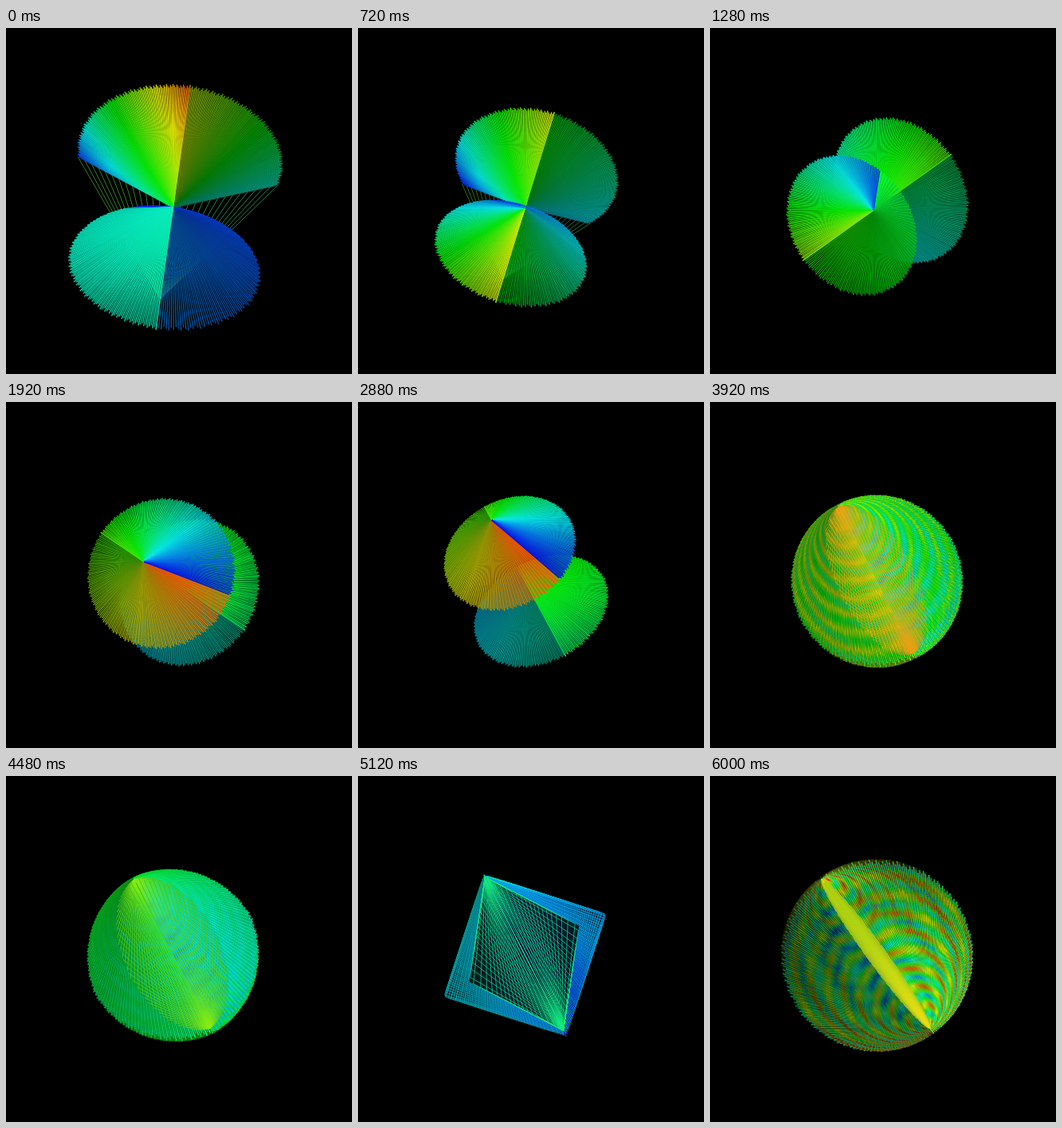
Animation, 434 px wide and 434 px high, one loop 6080 ms. Source, as an HTML page with a canvas:

```html
<!DOCTYPE html>
<html lang="en">
<head>
<meta charset="utf-8">
<title>Line sphere</title>
<style>
  html, body { margin: 0; width: 100%; height: 100%; overflow: hidden; background: #000; }
  canvas { display: block; }
</style>
</head>
<body>
<canvas id="stage" width="434" height="434"></canvas>
<script>
const SIZE = 434, LOOP = 6080, STEP = 80, LINES = 140;
const CENTRE = { x: 209.5, y: 225 };
const ctx = document.getElementById('stage').getContext('2d');

const lerp = (a, b, k) => a + (b - a) * k;
const clamp = x => Math.min(1, Math.max(0, x));
const smooth = x => { x = clamp(x); return x * x * (3 - 2 * x); };
const bell = (t, middle, width) => Math.exp(-(((t - middle) / width) ** 2));
const rad = deg => deg * Math.PI / 180;
const polar = (from, angle, r) => ({ x: from.x + r * Math.cos(rad(angle)), y: from.y + r * Math.sin(rad(angle)) });

// The key points on both sides of a time, and the eased weight between them.
function between(keys, t) {
  const i = Math.max(1, keys.findIndex(k => k[0] > t));
  const [a, b] = t >= keys.at(-1)[0] ? [keys.at(-1), keys.at(-1)] : [keys[i - 1], keys[i]];
  return [a[1], b[1], a === b ? 0 : smooth((t - a[0]) / (b[0] - a[0]))];
}
const track = (keys, t) => lerp(...between(keys, t));

const nearShift = [[0, 0.5], [720, 0.49], [1920, 0.16], [2880, 0.37], [3920, 0]];
const farShift = [[0, 0.42], [720, 0.4], [1920, 0.23], [2880, 0.4], [3920, 0]];
const lensWidth = [[3920, 0.45], [5120, 0.68], [6000, 0.1]];
const lensHue = [[3920, 38], [5120, 148], [6000, 56]];

// Hues at both ends of each half fan.
const cones = { nearLit: [105, 235], nearDark: [108, 20], farLit: [145, 112], farDark: [165, 205] };
const palettes = [
  [0, { nearLit: [165, 170], nearDark: [208, 230], farLit: [22, 225], farDark: [70, 170] }],
  [720, { nearLit: [68, 205], nearDark: [120, 226], farLit: [65, 235], farDark: [122, 185] }],
  [1920, cones],
  [2880, cones],
  [3920, { nearLit: [100, 150], nearDark: [95, 105], farLit: [100, 150], farDark: [80, 110] }],
  [5120, { nearLit: [160, 236], nearDark: [155, 212], farLit: [165, 236], farDark: [155, 210] }],
  [6000, { nearLit: [70, 110], nearDark: [70, 150], farLit: [85, 118], farDark: [60, 150] }]
];

function hues(t, name) {
  const [a, b, k] = between(palettes, t);
  return a[name].map((h, i) => lerp(h, b[name][i], k));
}

// An ellipse around a point on the axis; facet turns it into a diamond.
function rimPoint(rim, a) {
  const c = Math.cos(rad(a)), s = Math.sin(rad(a));
  const k = 1 / lerp(1, Math.abs(c) + Math.abs(s), rim.facet);
  return polar(polar(rim.centre, rim.axis, rim.deep * c * k), rim.axis + 90, rim.wide * s * k);
}

// A disc inside the sphere that touches it at the end of the axis.
function disc(axis, radius, shift, taper, facet) {
  return {
    axis, facet,
    centre: polar(CENTRE, axis, shift * radius),
    deep: (1 - shift) * radius,
    wide: (1 - taper * Math.sqrt(shift)) * radius
  };
}

function line(a, b, paint) {
  ctx.strokeStyle = paint;
  ctx.beginPath();
  ctx.moveTo(a.x, a.y);
  ctx.lineTo(b.x, b.y);
  ctx.stroke();
}

// colour(u, v, i): u runs around the rim, v from hub to rim.
function drawFan(hub, rim, span, count, stops, colour) {
  for (let i = 0; i < count; i++) {
    const u = i / (count - 1);
    const edge = rimPoint(rim, span * u);
    const reach = 1 - 0.035 * (i * 0.618 % 1) * (1 - rim.facet);
    const tip = { x: lerp(hub.x, edge.x, reach), y: lerp(hub.y, edge.y, reach) };
    const paint = ctx.createLinearGradient(hub.x, hub.y, tip.x, tip.y);
    for (let j = 0; j < stops; j++) {
      const v = j / (stops - 1);
      paint.addColorStop(v, colour(u, v, i));
    }
    line(hub, tip, paint);
  }
}

function drawHalf(t, name, hub, rim, span, bands) {
  const [from, to] = hues(t, name);
  const lit = name.endsWith('Lit'), far = name.startsWith('far');
  const pull = lit && far ? 0.8 : 0;
  drawFan(hub, rim, span, LINES, bands > 0.02 ? 40 : 4, (u, v, i) => {
    const wave = Math.sin(2 * Math.PI * 9 * v + 4 * u) ** 3;
    const hue = lerp(lerp(from, to, u), 112, pull * (1 - v)) + 95 * bands * wave;
    const base = lit ? 51 - 8 * v : (far ? 23 : 28) + 20 * u ** 4 * (far ? 0 : 1) + 6 * v;
    return `hsl(${Math.round(hue)},95%,${Math.round(base * (i % 2 ? 0.88 : 1))}%)`;
  });
}

// Loose threads from the open ends of the far fan to the opposite pole.
function drawWeb(rim, span, pole) {
  for (const side of [-1, 1]) {
    const end = rimPoint(rim, side * span);
    for (let j = 0; j < 14; j++) {
      const k = j / 14;
      const from = { x: lerp(end.x, CENTRE.x, k), y: lerp(end.y, CENTRE.y, k) };
      line(from, pole, `hsl(${130 + 20 * side},60%,32%)`);
    }
  }
}

function drawLens(t, hubs, axis, radius, facet) {
  const [a, b] = hubs;
  const rim = {
    axis, facet,
    centre: { x: (a.x + b.x) / 2, y: (a.y + b.y) / 2 },
    deep: Math.hypot(a.x - b.x, a.y - b.y) / 2,
    wide: track(lensWidth, t) * radius
  };
  const shown = smooth((t - 3300) / 600), hue = track(lensHue, t);
  ctx.globalAlpha = shown * facet * 0.8;
  ctx.fillStyle = '#000';
  ctx.beginPath();
  for (let d = 0; d < 360; d += 5) {
    const p = rimPoint(rim, d);
    ctx.lineTo(p.x, p.y);
  }
  ctx.fill();
  ctx.globalAlpha = shown * 0.8;
  ctx.lineWidth = 1;
  for (const hub of hubs) {
    for (const span of [180, -180]) {
      const start = hub === a ? axis : axis + 180;
      drawFan(hub, { ...rim, axis: start }, span, 36, 3,
        (u, v) => `hsl(${Math.round(hue + 25 * u * v)},85%,${Math.round(50 - 8 * v)}%)`);
    }
  }
}

function draw(t) {
  const late = smooth((t - 5200) / 800);
  const radius = 105 + 50 * Math.exp(-t / 785) + 17 * (t / LOOP) ** 4;
  const axis = 97 + 146 / (1 + Math.exp((1500 - t) / 300)) - 9 * late;
  const facet = bell(t, 5120, 380);
  const bands = 0.55 * bell(t, 3950, 400) + late;

  const nearHub = polar(CENTRE, axis, 0.97 * radius * Math.sin(Math.PI / 2 * clamp((t - 1200) / 2650)));
  const farHub = polar(CENTRE, axis + 180, 0.93 * radius * smooth((t - 2880) / 1040));
  const open = track(farShift, t);
  const nearRim = disc(axis, radius, track(nearShift, t), 0.3, facet);
  const farRim = disc(axis + 180, radius, open, 0.25, facet);
  const farSpan = 102 + 78 * smooth(t / 1900);
  const skew = 70 * open;

  ctx.globalAlpha = 1;
  ctx.fillStyle = '#000';
  ctx.fillRect(0, 0, SIZE, SIZE);

  ctx.lineWidth = 1;
  ctx.globalAlpha = 1 - smooth((t - 500) / 900);
  drawWeb(farRim, farSpan, polar(CENTRE, axis, 0.75 * radius));

  ctx.globalAlpha = 1;
  ctx.lineWidth = 1.4;
  drawHalf(t, 'farDark', farHub, farRim, farSpan, bands);
  drawHalf(t, 'farLit', farHub, farRim, -farSpan, bands);

  ctx.globalAlpha = 1 - 0.78 * late;
  drawHalf(t, 'nearDark', nearHub, nearRim, -180 - skew, bands);
  drawHalf(t, 'nearLit', nearHub, nearRim, 180 - skew, bands);

  drawLens(t, [nearHub, farHub], axis, radius, facet);
}

const start = performance.now();
let shown = -1;
function tick() {
  const step = Math.floor(((performance.now() - start) % LOOP) / STEP);
  if (step !== shown) draw((shown = step) * STEP);
  requestAnimationFrame(tick);
}
tick();
</script>
</body>
</html>
```
